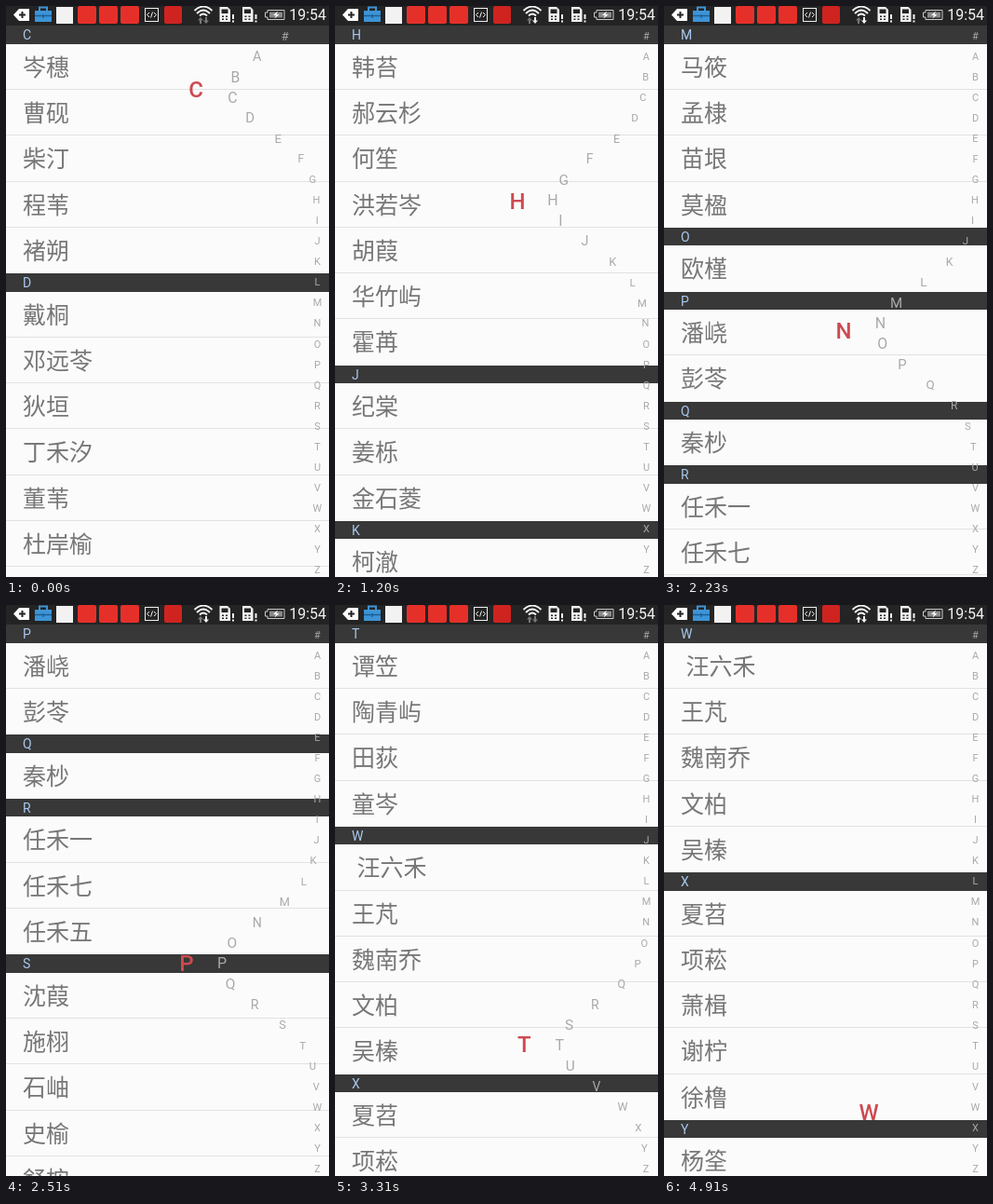
An HTML page for the animation above (5040 ms loop, 347 px wide and 613 px high).

```html
<!DOCTYPE html>
<html lang="zh-CN">
<head>
<meta charset="utf-8">
<style>
  html, body { margin: 0; width: 100%; height: 100%; overflow: hidden; background: #fbfbfb; }
  #stage { position: relative; width: 347px; height: 613px; overflow: hidden; background: #fbfbfb; }
  #list { position: absolute; left: 0; top: 21.3px; width: 100%; }
  .head {
    height: 19.4px; padding-left: 18px; background: #383838; color: #a9c9ee;
    font: 14px/20.5px Roboto, sans-serif;
  }
  .row {
    box-sizing: border-box; height: 49.3px; padding-left: 18px;
    border-bottom: 1px solid #e2e2e2; color: #777;
    font: 25px/47.2px "Noto Sans CJK SC", "Noto Sans CJK", sans-serif;
    white-space: pre; word-spacing: 1px;
  }
  .row:last-child { border-bottom-color: transparent; }
  svg { position: absolute; left: 0; top: 0; }
  svg text { font-family: Roboto, sans-serif; }
  #index text { fill: #a9a9a9; text-anchor: middle; }
  #index #big { fill: #cd4a50; font-size: 24px; font-weight: 500; }
</style>
</head>
<body>
<div id="stage">
  <div id="list"></div>
  <svg id="index" width="347" height="613"><text id="big"></text></svg>
  <svg id="status" width="347" height="21" fill="none">
    <rect width="347" height="22" fill="#242424"/>
    <path d="M8 9.5L14 3H25V16H14Z" fill="#fff"/>
    <path d="M17.5 6V13M14 9.5H21" stroke="#242424" stroke-width="2"/>
    <path d="M36 5V1.5H44V5" stroke="#3d94d6" stroke-width="2"/>
    <path d="M31 5H49V17H31Z" fill="#3d94d6"/>
    <path d="M31 10.5H49M40 9V13" stroke="#1f5f94" stroke-width="1.5"/>
    <rect x="54" y="1" width="18" height="18" fill="#f2f2f2"/>
    <g fill="#e5302a">
      <rect x="77" width="20" height="19" rx="2"/>
      <rect x="100" width="20" height="19" rx="2"/>
      <rect x="123" width="20" height="19" rx="2"/>
    </g>
    <rect x="170" width="19" height="19" rx="2" fill="#cf2320"/>
    <g stroke="#eee">
      <rect x="149.5" y="2.5" width="14" height="14"/>
      <path d="M154 7L151.5 9.5L154 12M159 7L161.5 9.5L159 12M157.5 6.5L155.5 12.5"/>
    </g>
    <path d="M202.5 5Q212 -4 221.5 5M205 8Q212 1 219 8M208 10.5Q212 6.500 216 10.5" stroke="#f4f4f4" stroke-width="1.8"/>
    <path id="up" d="M209 12L212 15.5H210V19H208V15.5H206Z"/>
    <path id="down" d="M215 19L218 15.5H216V12H214V15.5H212Z"/>
    <g id="sim">
      <path d="M229.5 1H238L241 4V17H229.5Z" fill="#f2f2f2"/>
      <path d="M231.5 3.5H238.5V8H231.5ZM232 10.5H234V12H232ZM236 10.5H238V12H236ZM232 13.5H234V15H232ZM236 13.5H238V15H236Z" fill="#242424"/>
      <path d="M244 9V14M244 15.5V17.5" stroke="#f2f2f2" stroke-width="2"/>
    </g>
    <use href="#sim" x="24.5"/>
    <path d="M281 4.5H299V14.5H281V12H278.5V7H281Z" stroke="#ccc"/>
    <rect x="283" y="6.5" width="14" height="6" fill="#8a8a8a"/>
    <path d="M292 5.5L287 10H290L288.5 13.5L293.5 9H290.5Z" fill="#fff"/>
    <text x="304.2" y="15" font-size="16" fill="#f4f4f4">19:54</text>
  </svg>
</div>
<script>
const LOOP = 5040;
const PITCH = 22.04, TOP = 21, REST_X = 334.5;
const LETTERS = '#ABCDEFGHIJKLMNOPQRSTUVWXYZ';
const SECTIONS = {
  C: '岑穗,曹砚,柴汀,程苇,褚朔',
  D: '戴桐,邓远苓,狄垣,丁禾汐,董苇,杜岸榆,窦岚,段葵',
  F: '冯屹',
  G: '甘雨槐,葛柏,耿峦,龚晚芦,谷 沐',
  H: '韩苔,郝云杉,何笙,洪若岑,胡葭,华竹屿,霍苒',
  J: '纪棠,姜栎,金石菱',
  K: '柯澈,孔蘅',
  L: '赖檀,雷榕,黎汀,李蕤,梁崧,廖杉,林漪,凌桦,柳茳,卢远樟,鲁知禾,骆棣,吕桉',
  M: '马筱,孟棣,苗垠,莫楹',
  O: '欧槿',
  P: '潘峣,彭苓',
  Q: '秦杪',
  R: '任禾一,任禾七,任禾五',
  S: '沈葭,施栩,石岫,史榆,舒桉,宋芷,苏垣,孙枞,孙竹溪,索苓,邵楫',
  T: '谭笠,陶青屿,田荻,童岑',
  W: ' 汪六禾,王芃,魏南乔,文柏,吴榛',
  X: '夏苕,项菘,萧楫,谢柠,徐橹',
  Y: '杨筌,姚荻,叶桴'
};

// Bursts of redraws: first ms, last ms, count
const BURSTS = [
  [30, 550, 11], [610, 1080, 10], [1140, 1630, 10], [1680, 2200, 10],
  [2230, 2730, 10], [2790, 3310, 10], [3360, 3820, 11], [3910, 3970, 2],
  [4360, 4360, 1], [4650, 4760, 3]
];
// Drag path: ms, x and y of the red letter
const PATH = [
  [0, 204, 90], [766, 198, 154], [1630, 194.5, 272], [2230, 193, 349],
  [2848, 197, 427], [3910, 213, 527], [3970, 216, 533], [4360, 220, 545]
];
const WIFI_TOGGLES = [300, 1400, 1950, 3050, 4360];

const $ = id => document.getElementById(id);
const big = $('big');

function addDiv(parent, cls, text) {
  const el = document.createElement('div');
  el.className = cls;
  el.textContent = text;
  parent.append(el);
  return el;
}

const sections = Object.entries(SECTIONS).map(([key, names]) => {
  const el = addDiv($('list'), 'section', '');
  addDiv(el, 'head', key);
  names.split(',').forEach(name => addDiv(el, 'row', name));
  return { key, el };
});

const marks = [...LETTERS].map((char, i) => {
  const el = document.createElementNS('http://www.w3.org/2000/svg', 'text');
  el.textContent = char;
  $('index').insertBefore(el, big);
  return { el, y: 32 + i * PITCH };
});

function place(el, x, y, size) {
  el.setAttribute('x', x.toFixed(2));
  el.setAttribute('y', (y + size * 0.355).toFixed(2));
  el.style.fontSize = size.toFixed(2) + 'px';
}

// Time of the latest redraw
function snap(t) {
  const burst = BURSTS.filter(b => b[0] <= t).pop();
  if (!burst) return 0;
  const [from, to, count] = burst;
  const step = count > 1 ? (to - from) / (count - 1) : 1;
  return from + step * Math.min(count - 1, Math.floor((t - from) / step + 0.35));
}

function slope(i, axis) {
  const a = PATH[Math.max(0, i - 1)], b = PATH[Math.min(PATH.length - 1, i + 1)];
  return (b[axis] - a[axis]) / (b[0] - a[0]);
}

// Cubic Hermite through the drag path
function along(t, axis) {
  const i = PATH.findIndex(p => p[0] > t) - 1;
  if (i < 0) return PATH[PATH.length - 1][axis];
  const a = PATH[i], b = PATH[i + 1], span = b[0] - a[0];
  const u = (t - a[0]) / span, v = 1 - u;
  return v * v * (1 + 2 * u) * a[axis] + u * u * (3 - 2 * u) * b[axis]
    + span * u * v * (v * slope(i, axis) - u * slope(i + 1, axis));
}

function draw(t) {
  const s = snap(t);
  const x = along(s, 1), y = along(s, 2);
  const chosen = LETTERS[Math.floor((y - TOP) / PITCH)];
  big.textContent = chosen;
  place(big, x, y - 0.7, 24);

  const current = sections.filter(sec => sec.key <= chosen).pop();
  sections.forEach(sec => { sec.el.hidden = sec.key < current.key; });

  // The index bends towards the finger in a bell as wide as it is deep
  const amp = 296.5 - x;
  const hold = s < 4650 ? 1 : (4760 - s) / 165;
  marks.forEach(({ el, y: my }) => {
    const pull = hold * Math.exp(-2.63 * (Math.abs(my - y) / amp) ** 2.12);
    place(el, REST_X - amp * pull, my, 11 + 5 * pull);
  });

  const active = WIFI_TOGGLES.filter(ms => ms <= t).length % 2;
  $('down').setAttribute('fill', active ? '#f4f4f4' : '#777');
  $('up').setAttribute('fill', t >= 4360 ? '#f4f4f4' : '#777');
}

const start = performance.now();
function tick() {
  draw((performance.now() - start) % LOOP);
  requestAnimationFrame(tick);
}
draw(0);
requestAnimationFrame(tick);
</script>
</body>
</html>
```
